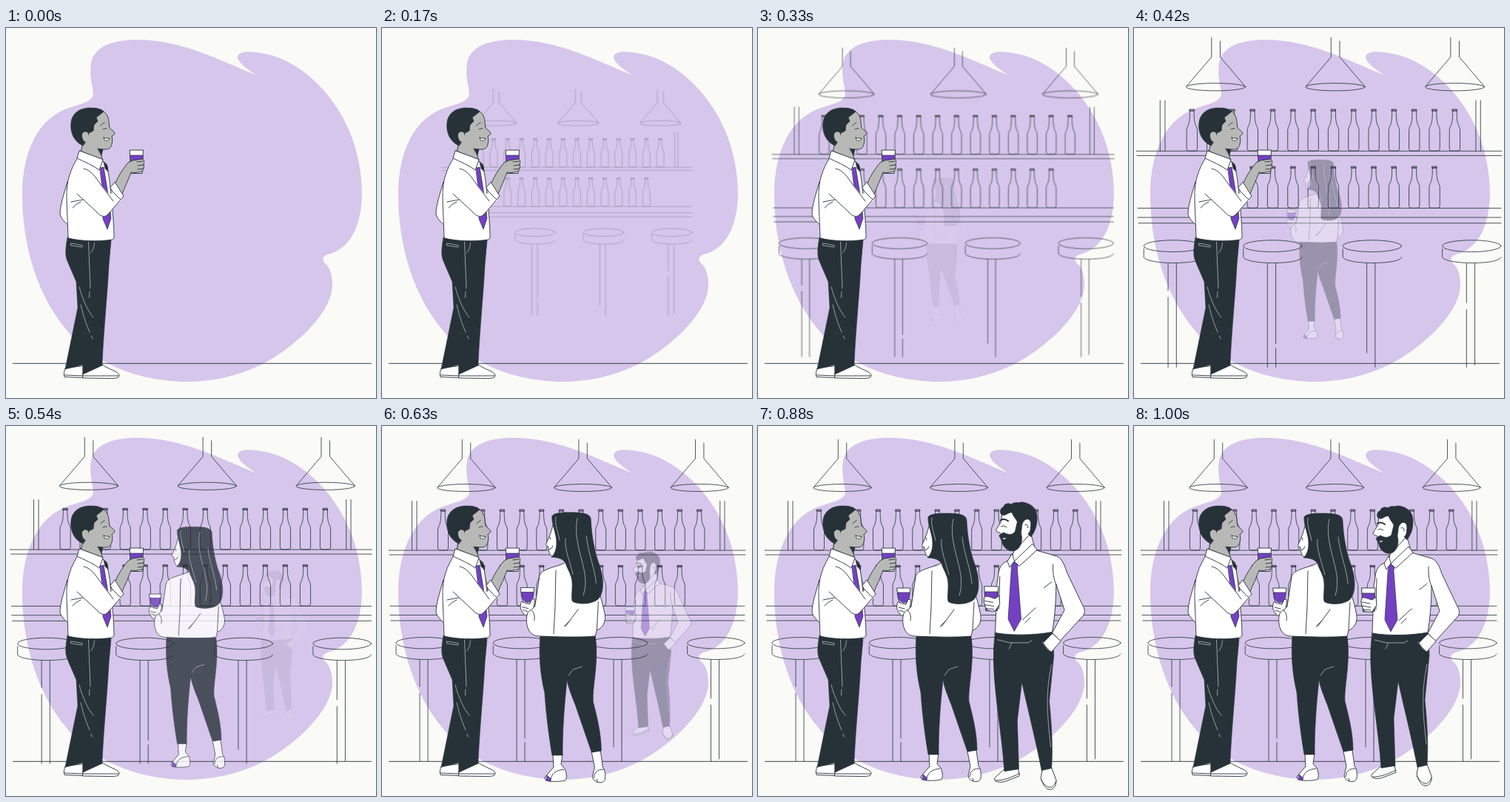
These frames come from a looping animation (500x500 px, 1.04 s). An HTML page:

```html
<!DOCTYPE html>
<html lang="en">
<head>
<meta charset="utf-8">
<title>Friends at the bar</title>
<style>
  /* progress of the pop; animating it keeps the lines sharp while they scale */
  @property --p { syntax: "<number>"; inherits: false; initial-value: 0; }

  html, body { margin: 0; width: 100%; height: 100%; overflow: hidden; background: #fafaf6; }
  svg { display: block; width: 100vw; height: 100vh; }
  path, ellipse { stroke-linecap: round; stroke-linejoin: round; }
  .line { fill: none; stroke: #263238; stroke-width: .9; }
  .bar { fill: none; stroke: #263238; stroke-width: .8; }
  .white { fill: #fff; stroke: #263238; stroke-width: .9; }
  .skin { fill: #b8b9b6; stroke: #263238; stroke-width: .9; }
  .dark { fill: #263238; stroke: #263238; stroke-width: .6; }
  .tint { fill: #7440c3; stroke: #263238; stroke-width: .7; }
  .pale { fill: none; stroke: #b4b9ba; stroke-width: .8; }
  .bare { stroke: none; }
  .thick { stroke-width: 2; }

  .pop {
    opacity: var(--p);
    transform: scale(calc(.5 + .5 * var(--p)));
    animation: 1040ms infinite linear;
  }
  #bar { transform-origin: 250px 236px; animation-name: bar; }
  #woman { transform-origin: 245px 299.5px; animation-name: woman; }
  #man { transform-origin: 373px 297px; animation-name: man; }

  /* the bar enters slightly into the same overshooting curve */
  @keyframes bar {
    0% { --p: .01; animation-timing-function: cubic-bezier(.339, .124, .499, 1.3635); }
    54.5%, 100% { --p: 1; }
  }
  @keyframes woman {
    0% { --p: 0; }
    24.5% { --p: 0; animation-timing-function: cubic-bezier(.36, -.01, .5, 1.38); }
    76.4%, 100% { --p: 1; }
  }
  @keyframes man {
    0% { --p: 0; }
    44.5% { --p: 0; animation-timing-function: cubic-bezier(.36, -.01, .5, 1.38); }
    96.4%, 100% { --p: 1; }
  }
</style>
</head>
<body>
<svg viewBox="0 0 500 500">
  <defs>
    <path id="bottle" d="M-3 0H3V2.2H-3ZM-3 1.1H3M-2.7 2.2C-2.7 10-3 15-4.5 20C-6 23-7 25-7 28V52Q-7 54.8-4 54.8H4Q7 54.8 7 52V28C7 25 6 23 4.5 20C3 15 2.7 10 2.7 2.2"/>
    <g id="lamp">
      <path d="M-5.7 18.5V44L-39 83M5.7 23V44L39 83"/>
      <ellipse cy="83.5" rx="39" ry="5"/>
    </g>
    <g id="seat">
      <ellipse cy="293.2" rx="38.7" ry="7.7"/>
      <path d="M-38.7 297V308C-37 312-21 315.5 0 315.5S37 313 38.7 308"/>
    </g>
  </defs>

  <path fill="#d6c6eb" d="M118 88C117 78 112 64 115 47C119 25 145 16 175 16C235 15 285 42 339 64C326 56 313 46 313 39C314 31 330 31 345 34C404 42 480 114 481 222C481 268 464 298 438 305C428 307 426 313 431 318C439 324 441 337 441 348C439 390 383 436 345 455C310 472 275 478 242 478C190 477 150 462 125 446C60 405 22 320 22 225C22 165 45 121 85 108C106 101 118 99 118 88Z"/>
  <path class="line" d="M9.500 453.300H493.500"/>

  <g id="bar" class="bar pop">
    <path d="M9 168H491M10 174H491M11 243.300H490M11 255.500H490M12 263H490M40.500 101.500V168M47 101.500V168M456.800 101.500V168M463 101.500V168"/>
    <path d="M51 316V352M51 361V453M62 316V453M182 316V453M193 316V422M193 428V453M313 316V434M324 316V453M444.500 316V368M444.500 377V453M455.500 316V450"/>
  </g>

  <g id="host">
    <path class="white" d="M83 208C78 225 73 240 73 252C75 258 80 263 85 267Z"/>
    <path class="white" d="M80 460C78 465 78 468 79 471.500L104 472.500V457Z"/>
    <path class="white" d="M104 467L130 455C138 461 152 464 153 469C153 473.500 148 473.500 140 473.500L104 473Z"/>
    <path class="line" d="M79 469L104 470L152 470"/>
    <path class="dark" d="M83 283C80 300 80 308 83 315L95 343L97 378L80 461L104 455V468L130 456C131 420 137 360 139 320L142 287Z"/>
    <path class="pale" d="M88 291L103 293.500V296L88 294ZM111.500 289L114 352M119.500 290C119 297 117 302 114 304M113 356L112.500 364M99 350C103 365 110 382 118 391M101 374C105 392 110 404 113 411M115 416L117 420"/>
    <path class="skin" d="M131 112C137 116 139 122 139 128L140 135C142 137 146 140 147 142C147 144 145 145 143 146C144 150 144 153 143 157C142 162 139 164 134 164H127L131 181L116 180L101 169L105 148L112 120Z"/>
    <path class="dark" d="M124 163L131 164L129 172Z"/>
    <path class="dark" d="M104 159C92 154 86 141 88 127C90 113 103 107 116 108C124 108 130 110 132 113L122 121L124 126L119 131L118 139L112 142L109 152Z"/>
    <path class="skin bare" d="M111 142C106 138 102 142 103 147C104 153 108 156 112 153Z"/>
    <path class="line" d="M128 132C129 130 131 129 133 128M131 137Q134 135 136 136"/>
    <path class="white" d="M132 148Q136 150 140 149Q138 154 134 152Z"/>
    <path class="white" d="M97 175C88 190 81 205 82 232L84 284C100 288 125 289 143 286C145 286 146 284 146 282C146 265 142 220 139 200L136 184L131 180L100 166Z"/>
    <path class="dark" d="M132 181L137 186L138 194L134 190Z"/>
    <path class="tint" d="M127 189L132 188L138 225L142 257L137 272L131 258L131 225Z"/>
    <path class="white" d="M99 166L96 176C106 181 117 185 126 192L131 178Z"/>
    <path class="white" d="M167.500 165H185.500L184 196.500H169Z"/>
    <path class="tint" d="M168 172H185L184.500 182H168.500Z"/>
    <path class="skin" d="M147 211C152 200 158 190 165 182L171 179L184 177C187 177 187 181 186 184C187 188 186 191 184 194L175 195.500L169 195C165 206 161 214 156 226Z"/>
    <path class="line" d="M177 181L185 180M178 186L186 185M178 191L185 190"/>
    <path class="white bare" d="M105 190C112 190 119 198 124 206L140 226L148 218L157 231L137 252C133 257 128 255 124 252L96 224Z"/>
    <path class="line" d="M105 190C112 191 119 198 124 206L145 234M96 224L124 250C128 255 134 256 138 252L154 233M88 235L104 232M90 243Q95 237 101 235"/>
    <path class="white" d="M144 212L147 208L159 227L155 232L144 221L141 216Z"/>
  </g>

  <g id="woman" class="pop">
    <path class="white" d="M231 443L232 460L220 474C220 480 235 480 247 478C251 477 249 463 246 461L242 456L244 443Z"/>
    <path class="tint" d="M223 471L228 475V479L222 478Z"/>
    <path class="line" d="M228 477C229 469 234 464 246 463"/>
    <path class="white" d="M283 440L287 460L284 473C286 482 300 483 301 476C302 466 300 462 298 460L295 438Z"/>
    <path class="line" d="M286 474C287 465 292 463 299 463M290 476L291 480"/>
    <path class="dark" d="M214 283C212 310 214 335 220 360C222 390 226 420 230 444H244C244 410 246 380 250 343C252 354 257 366 261 376L283 440L296 438C296 415 290 392 285 372C284 350 293 318 288 284Z"/>
    <path class="pale" d="M270 325L258 329L252 337"/>
    <path class="white" d="M188 219H206L204 233C203 237 200 239 199 241V250H195V241C191 239 190 236 189 231Z"/>
    <path class="tint" d="M189 225H205C205 232 203 238 197 239C191 238 189 232 189 225Z"/>
    <path class="white" d="M189 238C187 242 187 246 189 250L194 257L205 247L207 235L203 234L200 241L195 240Z"/>
    <path class="line" d="M190 245L198 247M191 249L197 251"/>
    <path class="white" d="M248 185C240 191 214 193 213 204L207 244L202 249C196 250 195 259 196 268C198 278 203 284 212 284C235 285 268 286 288 284L290 276C297 274 302 266 301 256C299 246 297 238 294 228Z"/>
    <path class="line" d="M235 196L234 245L232 281M202 249C206 252 207 258 206 263M265 248L248 271M254 263L246 271M292 238L290 276"/>
    <path class="white" d="M231 135C229 145 226 151 222 160C221 162 223 163 225 164C225 168 226 175 230 177L240 177V140Z"/>
    <path class="line" d="M227 151L228 154M226 168Q230 167 231 163"/>
    <path class="dark" d="M230 123C233 118 245 118 256 118C275 118 282 121 282 128C283 150 287 172 294 190C301 212 299 232 288 237C278 242 264 241 258 238C254 235 259 218 256 206C254 198 250 193 248 186C245 180 236 178 229 178C236 172 237 160 235 150C233 140 229 130 230 123Z"/>
    <path class="pale" d="M235 124C233 135 239 147 240 155M248 153C246 166 254 185 258 201M264 126C260 140 264 160 268 175C273 195 278 210 272 229M276 150C278 172 288 195 289 213"/>
  </g>

  <g id="man" class="pop">
    <path class="white" d="M333 460L321 471C320 477 330 477 336 475L354 468L352 458Z"/>
    <path class="line" d="M322 474C335 474 342 470 354 465"/>
    <path class="white" d="M384 460L382 470C384 478 388 486 394 486C400 486 403 478 402 473L396 457Z"/>
    <path class="line" d="M382 473C386 479 390 483 394 483S400 479 402 475"/>
    <path class="dark" d="M322 279Q360 285 398 279L399 310L393 370C396 400 398 430 396 458L383 461C376 425 366 385 357 345L351 395L353 459L334 462C331 410 318 350 320 300Z"/>
    <path class="pale" d="M325 289L341 293H365M344 293L340 301M365 293L370 290M384 292Q388 300 394 304M396 322C388 360 390 385 395 430"/>
    <path class="white" d="M339 185C330 188 327 195 326 204L320 244L323 253L322 280C345 284 375 283 397 279C400 260 402 240 402 216L413 250L397 280L407 291L438 257C440 253 440 249 438 246L416 200C412 187 408 181 402 179L374 171Z"/>
    <path class="line" d="M398 190Q397 205 402 217M328 206L327 248M396 213L386 221M375 247L358 263M368 260L361 267"/>
    <path class="white" d="M397 281L385 293C388 298 392 303 396 305L408 291Z"/>
    <path class="white" d="M369 150L374 168L349 187L343 184L348 168Z"/>
    <path class="tint" d="M344 187H352L351 196L356 262L347 278L339 262L343 199Z"/>
    <path class="white" d="M344 176L338 186L341 194L347 186ZM347 186L371 163L377 171L354 192Z"/>
    <path class="white" d="M331 120L330 133C328 138 324 142 323 145C324 148 327 148 329 149L335 164L355 164L368 150L370 125L350 115Z"/>
    <path class="dark" d="M331 125C326 122 330 114 333 115C333 110 340 109 343 111C348 107 353 110 356 108C366 109 378 114 377 130C377 140 374 147 369 154L365 150C370 146 371 134 366 131C361 129 357 135 357 141L356 149C359 160 355 169 348 172C340 174 332 168 331 160L327 152L333 148C340 152 345 151 348 147L351 134C349 130 345 126 344 122C339 121 336 127 331 125Z"/>
    <path class="white" d="M331 155Q334 156 337 154Q335 159 332 157Z"/>
    <path class="line" d="M330 140Q334 138 337 141M361 138Q365 136 365 142"/>
    <path class="line thick" d="M329 132Q334 129 339 133"/>
    <path class="white" d="M308 219H326L325 251H310Z"/>
    <path class="tint" d="M308.500 226H325.500L325 250H310Z"/>
    <path class="white" d="M308 233C311 230 316 234 322 235L327 231L328 242L322 251C317 252 311 251 310 248L308 243L307 238Z"/>
    <path class="line" d="M308 238L319 240M308 243L320 245M310 248L320 249"/>
  </g>
</svg>
<script>
  const bar = document.getElementById('bar');

  function place(name, x, y = 0) {
    const use = document.createElementNS('http://www.w3.org/2000/svg', 'use');
    use.setAttribute('href', '#' + name);
    use.setAttribute('x', x);
    use.setAttribute('y', y);
    bar.append(use);
  }

  const row = (name, count, x, step, y) => {
    for (let i = 0; i < count; i++) place(name, x + i * step, y);
  };

  row('lamp', 3, 114, 157.6);
  row('bottle', 14, 82.5, 26.65, 113);
  row('bottle', 11, 135.8, 26.65, 188.3);
  row('seat', 4, 57.7, 131.2);
</script>
</body>
</html>
```
